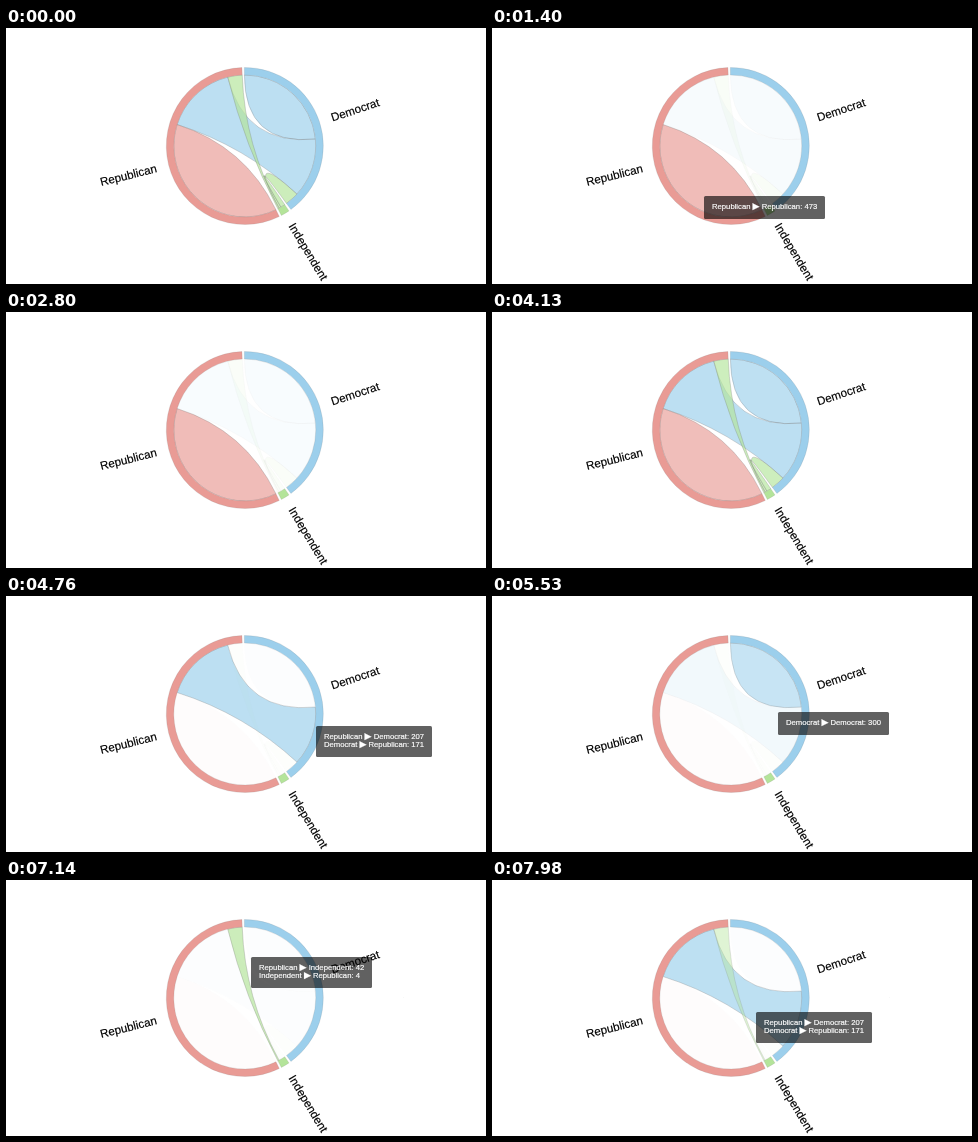
Animation of 480 by 256 pixels, one loop 8 s. Source, as an HTML page:

```html
<!DOCTYPE html>
<html>
<head>
<meta charset="utf-8">
<style>
html, body { margin: 0; width: 100%; height: 100%; overflow: hidden; background: #fff; }
svg { position: absolute; left: 0; top: 0; }
text { font: 11.6px "Liberation Sans", Arial, sans-serif; stroke: #000; stroke-width: .15; }
.chord { fill-opacity: .67; stroke: #707070; stroke-opacity: .55; stroke-width: .5; }
.ring { stroke: #808080; stroke-opacity: .35; stroke-width: .5; }
#tip {
  position: absolute; margin-top: -.5px; padding: 7.5px 8px; border-radius: 1.5px; white-space: pre;
  background: rgba(0, 0, 0, .62); color: #fff; -webkit-text-stroke: .2px #fff;
  font: 7.7px/8px "Liberation Sans", Arial, sans-serif;
}
#tip i { font: 9px/0 "DejaVu Sans", sans-serif; }
</style>
</head>
<body>
<svg width="480" height="256"><g id="plot" transform="translate(238.8 118)"></g></svg>
<div id="tip"></div>
<script>
const LOOP = 8000, OUTER = 78.5, INNER = 71, LABEL = 91, PAD = .03, FADED = .03;
const RED = '#e99b95', BLUE = '#9ccfec', GREEN = '#b4e49a';
const plot = document.getElementById('plot'), tip = document.getElementById('tip');

// Flows out of each group, largest first
const groups = [
  { name: 'Democrat', color: BLUE, flows: { D: 300, R: 171, I: 40 } },
  { name: 'Independent', color: GREEN, flows: { I: 13, D: 6, R: 4 } },
  { name: 'Republican', color: RED, flows: { R: 473, D: 207, I: 42 } }
];
const byKey = Object.fromEntries(groups.map(g => [g.name[0], g]));
const sum = g => Object.values(g.flows).reduce((a, b) => a + b);
const scale = (2 * Math.PI - PAD * groups.length) / groups.reduce((a, g) => a + sum(g), 0);

function add(tag, attrs, text = '') {
  const el = document.createElementNS('http://www.w3.org/2000/svg', tag);
  for (const k in attrs) el.setAttribute(k, attrs[k]);
  el.textContent = text;
  return plot.appendChild(el);
}
const at = (r, a) => `${(r * Math.sin(a)).toFixed(2)} ${(-r * Math.cos(a)).toFixed(2)}`;
const arc = (r, a, b) => `A${r} ${r} 0 ${+(Math.abs(b - a) > Math.PI)} ${+(b > a)} ${at(r, b)}`;

const spans = {};
let angle = -.006;
for (const g of groups) {
  const start = angle;
  for (const to in g.flows) {
    const end = angle + g.flows[to] * scale;
    spans[g.name[0] + to] = [angle, end];
    angle = end;
  }
  g.span = [start, angle];
  angle += PAD;
}

const chords = {};
for (const [key, color] of [['DD', BLUE], ['DR', BLUE], ['RR', RED], ['DI', GREEN], ['RI', GREEN], ['II', GREEN]]) {
  const [a, b] = spans[key], [c, d] = spans[key[1] + key[0]];
  let path = `M${at(INNER, a)}${arc(INNER, a, b)}`;
  if (key[0] !== key[1]) path += `Q0 0 ${at(INNER, c)}${arc(INNER, c, d)}`;
  chords[key] = add('path', { class: 'chord', fill: color, d: path + `Q0 0 ${at(INNER, a)}Z` });
}

for (const g of groups) {
  const [a, b] = g.span, mid = (a + b) / 2, left = mid > Math.PI;
  add('path', {
    class: 'ring', fill: g.color,
    d: `M${at(OUTER, a)}${arc(OUTER, a, b)}L${at(INNER, b)}${arc(INNER, b, a)}Z`
  });
  add('text', {
    transform: `rotate(${mid * 180 / Math.PI - 90}) translate(${LABEL})` + (left ? ' rotate(180)' : ''),
    dy: '.35em', 'text-anchor': left ? 'end' : 'start'
  }, g.name);
}

// [start, duration, chords kept visible]
const ALL = Object.keys(chords);
const fades = [
  [1110, 400, ['RR']], [2640, 600, ALL], [4060, 400, ['DR']], [5270, 400, ['DD']],
  [6720, 400, ['RI']], [7650, 400, ['DR', 'RI']], [7800, 400, ['DR']]
];
// [from, until, chord, x, y]
const tips = [
  [1020, 2590, 'RR', 212, 168], [2590, 2700, 'RR', 219, 186], [4180, 5270, 'DR', 310, 130],
  [5270, 6740, 'DD', 286, 116], [6740, 7700, 'RI', 245, 77], [7700, LOOP, 'DR', 264, 132]
];

const ease = u => u < .5 ? 4 * u ** 3 : 1 - 4 * (1 - u) ** 3;
const clamp = u => Math.min(1, Math.max(0, u));

function opacity(key, t) {
  let value = 1;
  for (const [start, length, kept] of fades) {
    const goal = kept.includes(key) ? 1 : FADED;
    value += (goal - value) * ease(clamp((t - start) / length));
  }
  return value;
}

function tipText(key) {
  const line = (a, b) => `${byKey[a].name} <i>▶</i> ${byKey[b].name}: ${byKey[a].flows[b]}`;
  const [a, b] = key === 'DR' ? 'RD' : key;
  return a === b ? line(a, b) : line(a, b) + '\n' + line(b, a);
}

function draw(t) {
  for (const key of ALL) chords[key].setAttribute('opacity', opacity(key, t));
  const current = tips.find(([from, until]) => t >= from && t < until);
  tip.hidden = !current;
  if (!current) return;
  const [, , key, x, y] = current;
  tip.innerHTML = tipText(key);
  tip.style.left = x + 'px';
  tip.style.top = y + 'px';
}

const begin = performance.now();
function tick() {
  draw((performance.now() - begin) % LOOP);
  requestAnimationFrame(tick);
}
tick();
</script>
</body>
</html>
```
